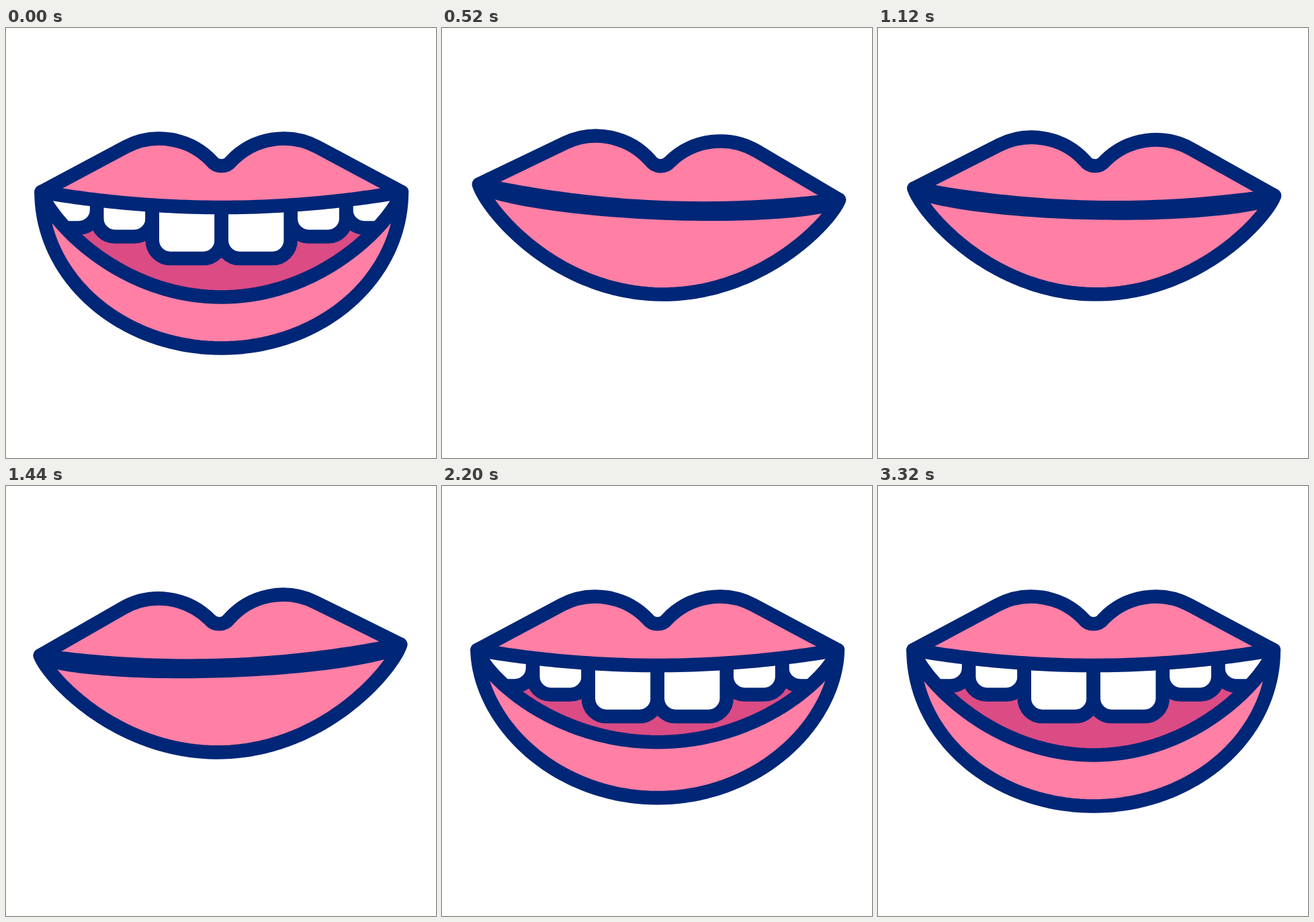
Animation of 640 by 640 pixels, one loop 3.68 s. Source, as an HTML page:

```html
<!DOCTYPE html>
<html>
<head>
<meta charset="utf-8">
<style>
  html, body { margin: 0; width: 100%; height: 100%; overflow: hidden; background: #fff; }
  svg { display: block; width: 100vw; height: 100vh; }
  #face { stroke: #002677; stroke-width: 20.6; stroke-linejoin: round; }
  .lip { fill: #ff7fa5; }
  .tooth { fill: #fff; }
  .spark { fill: none; stroke: #ffcb45; stroke-width: 25; stroke-linecap: round; }
</style>
</head>
<body>
<svg viewBox="0 0 640 640">
  <clipPath id="gap"><path id="mouth"/></clipPath>
  <g id="face">
    <g id="teeth" clip-path="url(#gap)"></g>
    <path id="lower" class="lip"/>
    <path id="upper" class="lip"/>
  </g>
  <path id="left" class="spark"/>
  <path id="right" class="spark"/>
</svg>
<script>
const LOOP = 3680, AXIS = 320.7, CORNER = 244, HALF = 268.2;
const $ = id => document.getElementById(id);
const set = (id, name, value) => $(id).setAttribute(name, value);
const ease = u => (u = Math.min(1, Math.max(0, u)), u * u * (3 - 2 * u));
const mix = (a, b, u) => a + (b - a) * u;

// Hanging curve between the mouth corners: power 1 is an ellipse, 2 a parabola
function bow(depth, power) {
  return Array.from({ length: 81 }, (_, i) => {
    const a = Math.PI * i / 80;
    const y = CORNER + depth * Math.abs(Math.sin(a)) ** power;
    return [(AXIS - HALF * Math.cos(a)).toFixed(2), y.toFixed(2)];
  });
}
const band = (top, bottom) => `M${[...top, ...bottom.slice(1, -1).reverse()].join('L')}Z`;
const gum = bow(23, 2);

const hump = 'A107.5 107.5 0 0 1';
set('upper', 'd', `M${gum.slice().reverse().join('L')}L178 177${hump}306 198
  A18.5 18.5 0 0 0 335.4 198${hump}463.4 177Z`);

function tooth(near, far, bottom) {
  return [AXIS - far, AXIS + near].map(x => `<rect class="tooth" x="${x}" y="200"
    width="${far - near}" height="${bottom - 200}" rx="27"/>`).join('');
}
$('teeth').innerHTML = '<rect width="640" height="640" fill="#db4b84"/>'
  + tooth(185.5, 290, 297.5) + tooth(103, 185.5, 310.5) + tooth(0, 103, 343);

// The shut mouth rocks from side to side, dying away
const swing = [0, 4, -4, 2.4, -2, 0];
function tilt(t) {
  const s = Math.min(4.999, Math.max(0, (t - 360) / 280)), i = Math.floor(s);
  return mix(swing[i], swing[i + 1], ease(s - i));
}

function spark(id, x, y, age) {
  const u = age / 760, r = 36 * ease(age / 280) * ease((760 - age) / 280);
  set(id, 'd', u > 0 && u < 1 ? `M${-r} 0H${r}M0 ${-r}V${r}` : '');
  set(id, 'transform', `translate(${x} ${y}) rotate(${45 - 90 * u})`);
}

function draw(t) {
  const open = 1 - ease(t / 480) + ease((t - 1840) / 480);
  const rim = bow(mix(152.3, 232.5, open), mix(1.6, 1, open));
  const edge = bow(mix(31, 156.5, open), mix(1.2, 1.55, open));
  set('mouth', 'd', band(gum, edge));
  set('lower', 'd', band(edge, rim));
  set('face', 'transform', `rotate(${tilt(t)} ${AXIS} 298)`);
  spark('left', 267, 328, t - 2430);
  spark('right', 406, 329.5, t - 2560);
}

const begin = performance.now();
function frame() {
  draw((performance.now() - begin) % LOOP);
  requestAnimationFrame(frame);
}
frame();
</script>
</body>
</html>
```
